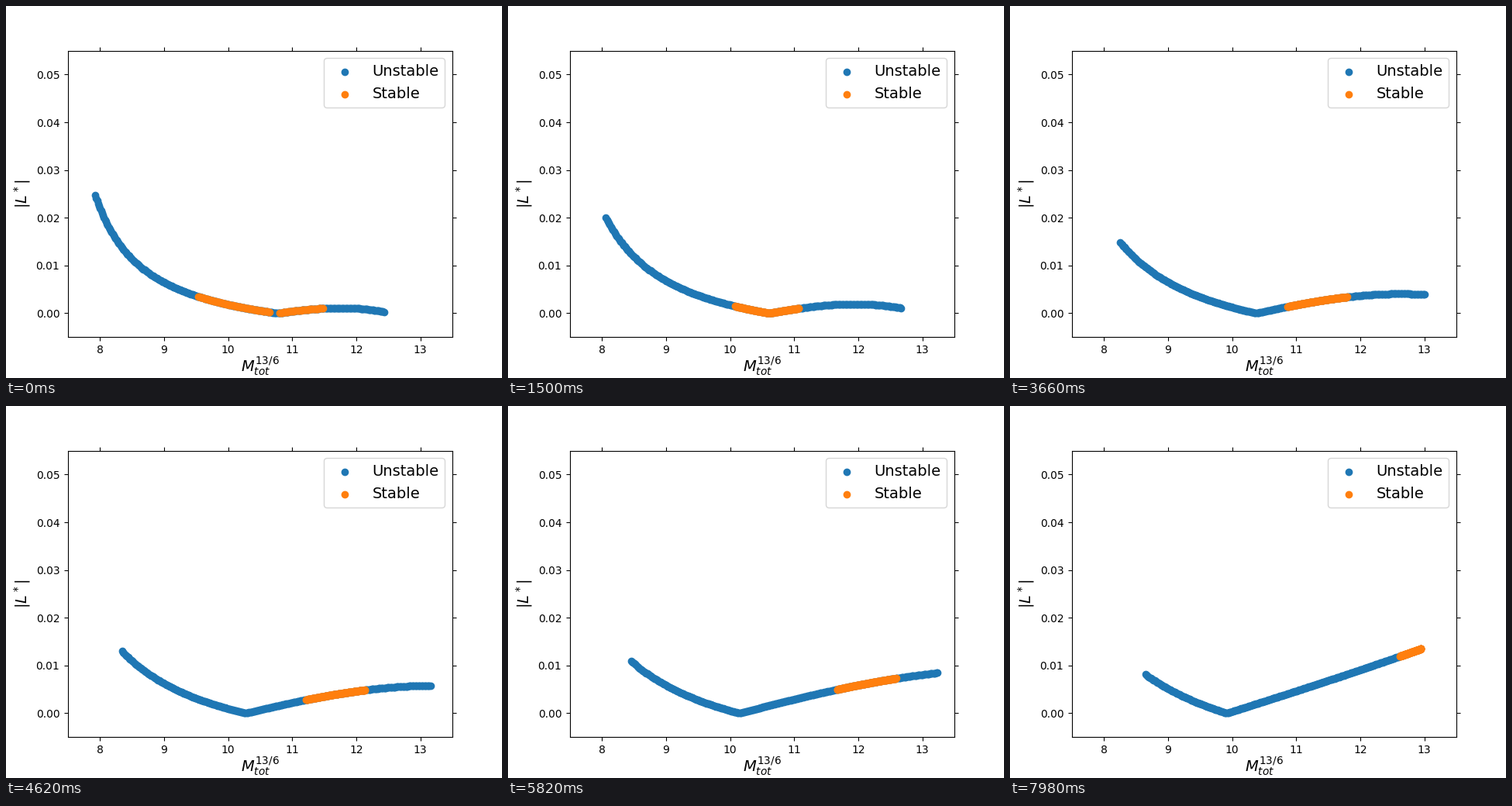
Animation of 640 by 480 pixels, one loop 8000 ms. Source, as a matplotlib script:

```python
import numpy as np
import matplotlib.pyplot as plt
from matplotlib.animation import FuncAnimation

LOOP, INTERVAL = 8000, 50  # ms


def start_x(u):
    return 7.925 + 0.725 * u


def zero_x(u):
    return 10.77 - 0.86 * u


def end_x(u):
    """The right end moves out, then turns back."""
    return min(12.43 + 1.265 * u, 13.995 - 1.052 * u)


def curve(u, x):
    """Hyperbola left of the zero, a bending line of equal slope right of it."""
    x0, xz, x1 = start_x(u), zero_x(u), end_x(u)
    top = 0.0247 * np.exp(-1.12 * u)
    flat = 0.215 + 0.455 * u
    slope = flat * top / (xz - x0)
    sag = 0.0028 + 0.00715 * u - 0.0106 * u**2

    s = np.clip((xz - x) / (xz - x0), 0, 1)
    r = np.clip((x - xz) / (x1 - xz), 0, 1)
    left = top * flat * s / (1 - (1 - flat) * s)
    right = slope * (x1 - xz) * r - sag * r**2.6
    return np.column_stack([x, np.abs(left - right)])


def stable_x(u):
    """A sliding window that narrows early and has a brief gap at the zero."""
    lo = 9.53 + 2.93 * u + 0.19 * u**8
    hi = min(lo + 0.92 + 1.03 * np.exp(-14 * u), end_x(u))
    x = np.linspace(lo, hi, 120)
    return x[np.abs(x - zero_x(u) + 0.04) >= 0.07 - u]


fig, ax = plt.subplots(figsize=(6.4, 4.8), dpi=100)
unstable = ax.scatter([], [], color="C0", label="Unstable")
stable = ax.scatter([], [], color="C1", label="Stable")
ax.set_xlim(7.5, 13.5)
ax.set_ylim(-0.005, 0.055)
ax.set_xticks(range(8, 14))
ax.set_yticks(np.arange(6) / 100)
ax.tick_params(top=True, right=True)
ax.tick_params(axis="y", pad=4.2)
ax.set_xlabel(r"$M_{tot}^{13/6}$", fontsize=14, labelpad=0.4)
ax.set_ylabel(r"$|L^*|$", fontsize=14, labelpad=3.3)
ax.legend(loc="upper right", fontsize=14)


def draw(i):
    u = i * INTERVAL / LOOP
    x = np.linspace(start_x(u), end_x(u), 300)
    unstable.set_offsets(curve(u, x))
    stable.set_offsets(curve(u, stable_x(u)))
    return unstable, stable


anim = FuncAnimation(fig, draw, frames=LOOP // INTERVAL, interval=INTERVAL,
                     repeat=True, repeat_delay=0)
plt.show()
```
